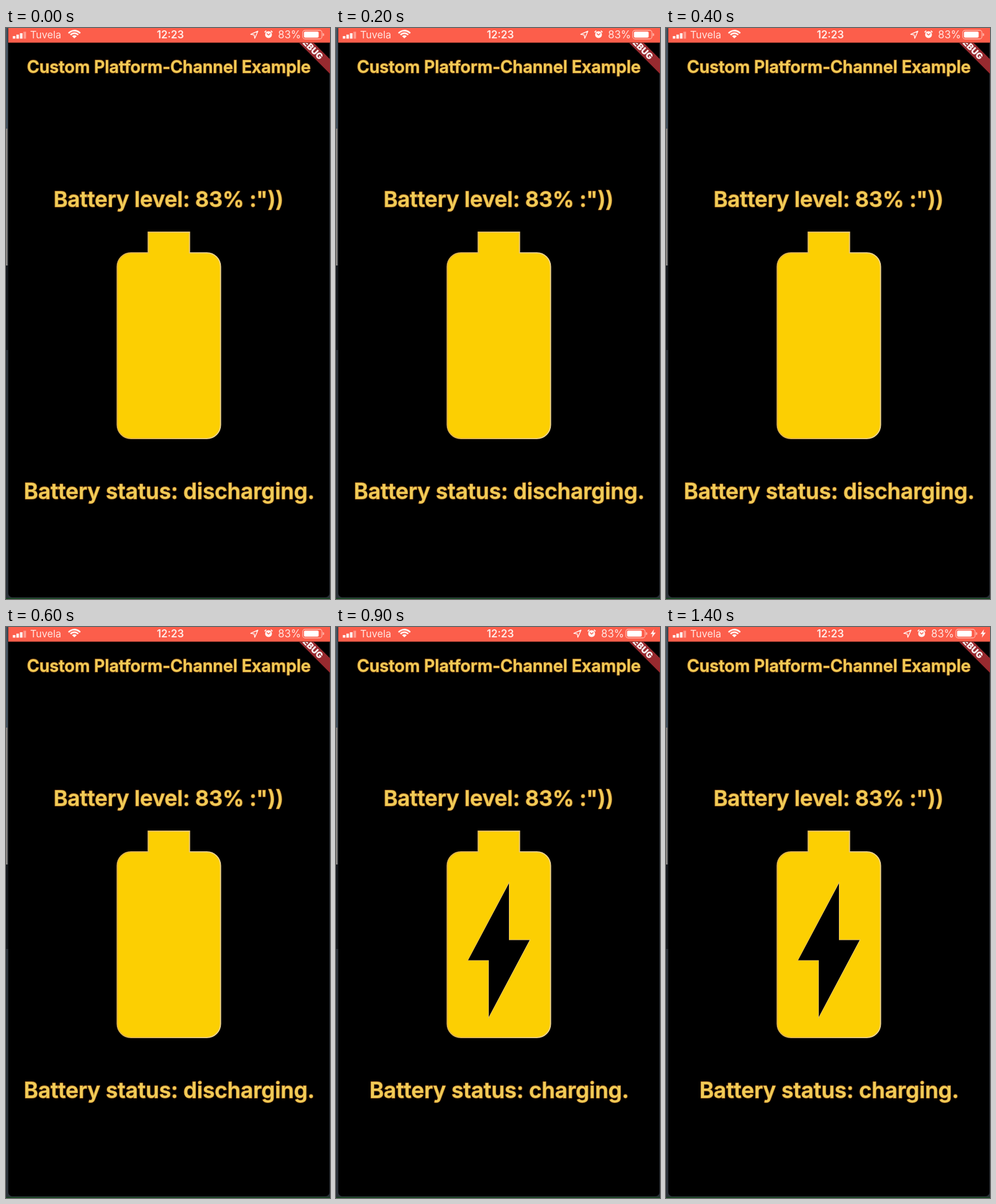
An HTML page with a canvas that plays this animation: 564 px wide and 993 px high, repeating every 1.5 s.

```html
<!DOCTYPE html>
<html lang="en">
<head>
<meta charset="utf-8">
<title>Battery status</title>
<style>
html, body { margin: 0; width: 100%; height: 100%; overflow: hidden; background: #000; }
canvas { display: block; }
</style>
</head>
<body>
<canvas id="stage" width="564" height="993"></canvas>
<script>
const W = 564, H = 993, LOOP = 1500, PLUG_IN = 700;
const ctx = document.getElementById('stage').getContext('2d');
const FONT = 'Inter, "Liberation Sans", sans-serif';
const GOLD = '#fccf02', WHITE = '#fff1ee';

const rim = ctx.createLinearGradient(193, 0, 374, 0);
rim.addColorStop(0, '#dfb047');
rim.addColorStop(1, '#ecd28c');

function rect(x, y, w, h, color) {
  ctx.fillStyle = color;
  ctx.fillRect(x, y, w, h);
}

function rounded(x, y, w, h, r) {
  ctx.beginPath();
  ctx.roundRect(x, y, w, h, r);
}

function polygon(points) {
  ctx.beginPath();
  points.forEach(([x, y]) => ctx.lineTo(x, y));
  ctx.closePath();
}

function label(text, x, y, size, weight, color, align = 'left') {
  ctx.font = `${weight} ${size}px ${FONT}`;
  ctx.textAlign = align;
  ctx.fillStyle = color;
  ctx.fillText(text, x, y);
}

function heading(text, x, y, size) {
  ctx.font = `600 ${size}px ${FONT}`;
  ctx.textAlign = 'center';
  ctx.lineJoin = 'round';
  ctx.lineWidth = 1.8;
  ctx.strokeStyle = '#94591c';
  ctx.strokeText(text, x, y);
  label(text, x, y, size, 600, '#f0cc57', 'center');
}

function drawBackdrop() {
  rect(0, 0, W, H, '#2b3138');
  rect(0, 0, 3, 175, '#45535f');
  rect(0, 175, 2.5, 238, '#8d8a86');
  rect(0, 413, 4, 147, '#14171c');
  ctx.fillStyle = '#000';
  rounded(4, 0, 559, 990, [0, 0, 7, 7]);
  ctx.fill();
  rect(0, 991.5, W, 1.5, '#124a1a');
}

function drawRibbon() {
  ctx.save();
  ctx.beginPath();
  ctx.rect(4, 25, W - 4, 70);
  ctx.clip();
  ctx.translate(530.5, 33.5);
  ctx.rotate(Math.PI / 4);
  rect(-80, -9, 160, 18, '#982a2f');
  label('DEBUG', 0, 5.5, 15.3, 900, '#f6eeee', 'center');
  ctx.restore();
}

function drawWifi(x, y) {
  ctx.fillStyle = ctx.strokeStyle = WHITE;
  ctx.lineWidth = 2.8;
  for (const r of [9, 13.5]) {
    ctx.beginPath();
    ctx.arc(x, y, r, -Math.PI * 0.77, -Math.PI * 0.23);
    ctx.stroke();
  }
  ctx.beginPath();
  ctx.moveTo(x, y);
  ctx.arc(x, y, 5.5, -Math.PI * 0.77, -Math.PI * 0.23);
  ctx.fill();
}

function drawAlarm(x, y) {
  ctx.fillStyle = ctx.strokeStyle = WHITE;
  ctx.beginPath();
  ctx.arc(x, y, 6, 0, Math.PI * 2);
  ctx.fill();
  ctx.lineWidth = 1.8;
  for (const side of [-1, 1]) {
    ctx.beginPath();
    ctx.moveTo(x + side * 6.8, y - 4);
    ctx.lineTo(x + side * 4, y - 6.8);
    ctx.stroke();
  }
  ctx.strokeStyle = '#fa5c49';
  ctx.lineWidth = 1.4;
  ctx.beginPath();
  ctx.moveTo(x - 3, y - 2);
  ctx.lineTo(x, y + 0.7);
  ctx.lineTo(x + 3, y - 2);
  ctx.stroke();
}

function drawStatusBar(charging) {
  rect(4, 0, W - 4, 25, '#fc5e4b');
  rect(4, 25, W - 4, 1, '#7d2f26');
  for (let i = 0; i < 4; i++) {
    const h = 4.5 + i * 2.5;
    rect(11.8 + i * 6.2, 18.5 - h, 4.6, h, i < 3 ? WHITE : '#ff9b8d');
  }
  label('Tuvela', 42, 18, 17.5, 400, '#ffe5e0');
  drawWifi(119, 18);
  label('12:23', 286, 18, 18, 600, '#ffebe7', 'center');

  ctx.save();
  if (charging) ctx.translate(-12, 0);
  ctx.strokeStyle = WHITE;
  ctx.lineWidth = 1.5;
  polygon([[426, 11], [438.5, 5.5], [433, 18], [432, 12]]);
  ctx.stroke();
  drawAlarm(457, 11.5);
  label('83%', 473.5, 18, 18, 400, '#ffe5e0');
  ctx.strokeStyle = '#ffb5a9';
  ctx.lineWidth = 1.3;
  rounded(516.5, 4, 33.5, 15, 4);
  ctx.stroke();
  ctx.fillStyle = '#fff';
  rounded(518.7, 6.2, 25.5, 10.6, 2);
  ctx.fill();
  ctx.fillStyle = '#ffb5a9';
  rounded(551.5, 9, 2.3, 5, [0, 2, 2, 0]);
  ctx.fill();
  ctx.restore();

  if (charging) {
    ctx.fillStyle = WHITE;
    polygon([[553.5, 4], [547.5, 12.3], [551, 12.3], [549.8, 18.5], [556.5, 9.8], [552.5, 9.8]]);
    ctx.fill();
  }
}

function drawBattery(charging) {
  ctx.beginPath();
  ctx.moveTo(247.5, 355);
  ctx.lineTo(319.5, 355);
  ctx.lineTo(319.5, 391);
  ctx.arcTo(373.5, 391, 373.5, 714, 24);
  ctx.arcTo(373.5, 714, 193.5, 714, 24);
  ctx.arcTo(193.5, 714, 193.5, 391, 24);
  ctx.arcTo(193.5, 391, 247.5, 391, 24);
  ctx.lineTo(247.5, 391);
  ctx.closePath();
  ctx.fillStyle = GOLD;
  ctx.fill();
  ctx.lineJoin = 'miter';
  ctx.strokeStyle = rim;
  ctx.lineWidth = 2;
  ctx.stroke();
  if (!charging) return;
  polygon([[301, 446], [301, 544.5], [337, 544.5], [266, 678], [266, 579.5], [230, 579.5]]);
  ctx.stroke();
  ctx.fillStyle = '#000';
  ctx.fill();
}

function draw(time) {
  const charging = time % LOOP >= PLUG_IN;
  drawBackdrop();
  drawRibbon();
  drawStatusBar(charging);
  heading('Custom Platform-Channel Example', 283.5, 78, 29.2);
  heading('Battery level: 83% :"))', 283, 310.5, 37.4);
  drawBattery(charging);
  heading(`Battery status: ${charging ? 'charging' : 'discharging'}.`, 284, 818.5, 37.9);
}

let start;
function tick(now) {
  start ??= now;
  draw(now - start);
  requestAnimationFrame(tick);
}
draw(0);
requestAnimationFrame(tick);
</script>
</body>
</html>
```
